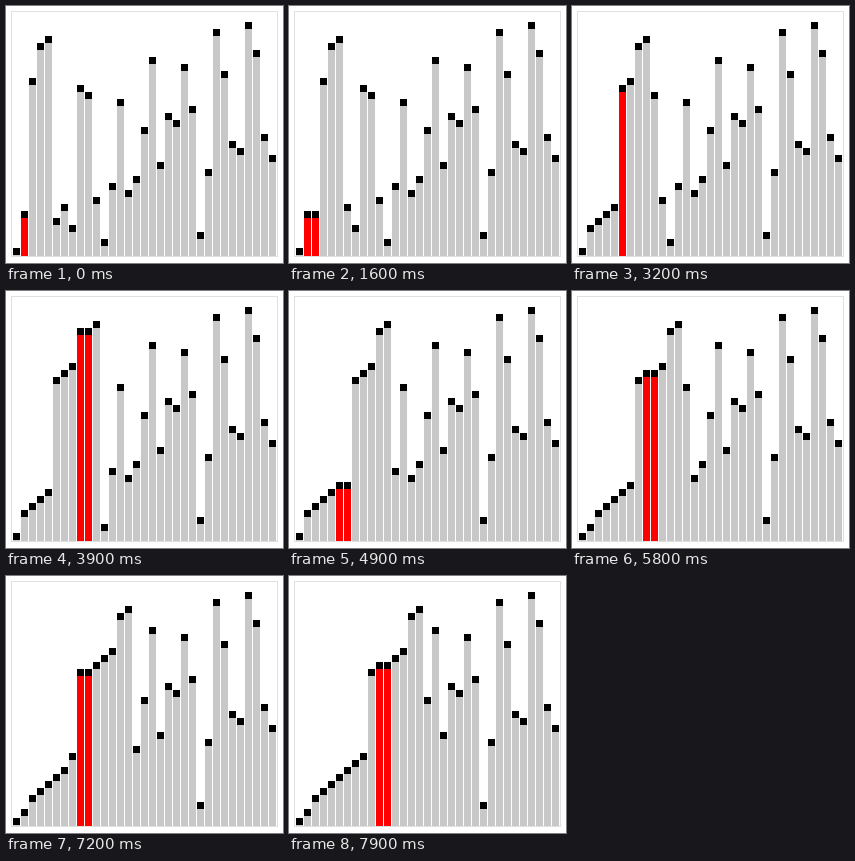
An HTML page with a canvas that plays this animation: 277x257 px, repeating every 8000 ms.

```html
<!DOCTYPE html>
<html lang="en">
<head>
<meta charset="utf-8">
<title>Insertion sort</title>
<style>
  html, body { margin: 0; width: 100%; height: 100%; overflow: hidden; background: #fff; }
  canvas { display: block; }
</style>
</head>
<body>
<canvas id="stage" width="277" height="257"></canvas>
<script>
const ctx = document.getElementById('stage').getContext('2d');
const START = [0, 5, 24, 29, 30, 4, 6, 3, 23, 22, 7, 1, 9, 21, 8, 10, 17,
  27, 12, 19, 18, 26, 20, 2, 11, 31, 25, 15, 14, 32, 28, 16, 13];
const LOOP = 8000, HOLD = 1000, STEP = 100;
const SIZE = 7, PITCH = 8, BASE = 250;

// One state per shift, then one for placing the key.
function sortStates(values, count) {
  const list = values.slice(), states = [];
  const record = (...active) => states.push({ list: list.slice(), active });
  for (let i = 1; states.length < count; i++) {
    const key = list[i];
    let j = i;
    for (; j > 0 && list[j - 1] > key; j--) {
      list[j] = list[j - 1];
      record(j - 1, j);
    }
    list[j] = key;
    record(j);
  }
  return states;
}

const states = sortStates(START, 1 + (LOOP - HOLD) / STEP);

function fill(color, x, y, w, h) {
  ctx.fillStyle = color;
  ctx.fillRect(x, y, w, h);
}

function draw({ list, active }) {
  fill('#fff', 0, 0, 277, 257);
  ctx.strokeStyle = '#e0e0e0';
  ctx.strokeRect(5.5, 5.5, 266, 245);
  list.forEach((value, i) => {
    const x = 7 + i * PITCH;
    const top = value ? 240 - value * SIZE : 242;
    fill(active.includes(i) ? '#f00' : '#c8c8c8', x, top, SIZE, BASE - top);
    fill('#000', x, top, SIZE, SIZE);
  });
}

function tick() {
  const time = performance.now() % LOOP;
  const step = Math.max(0, Math.floor((time - HOLD) / STEP) + 1);
  draw(states[step]);
  requestAnimationFrame(tick);
}
tick();
</script>
</body>
</html>
```
